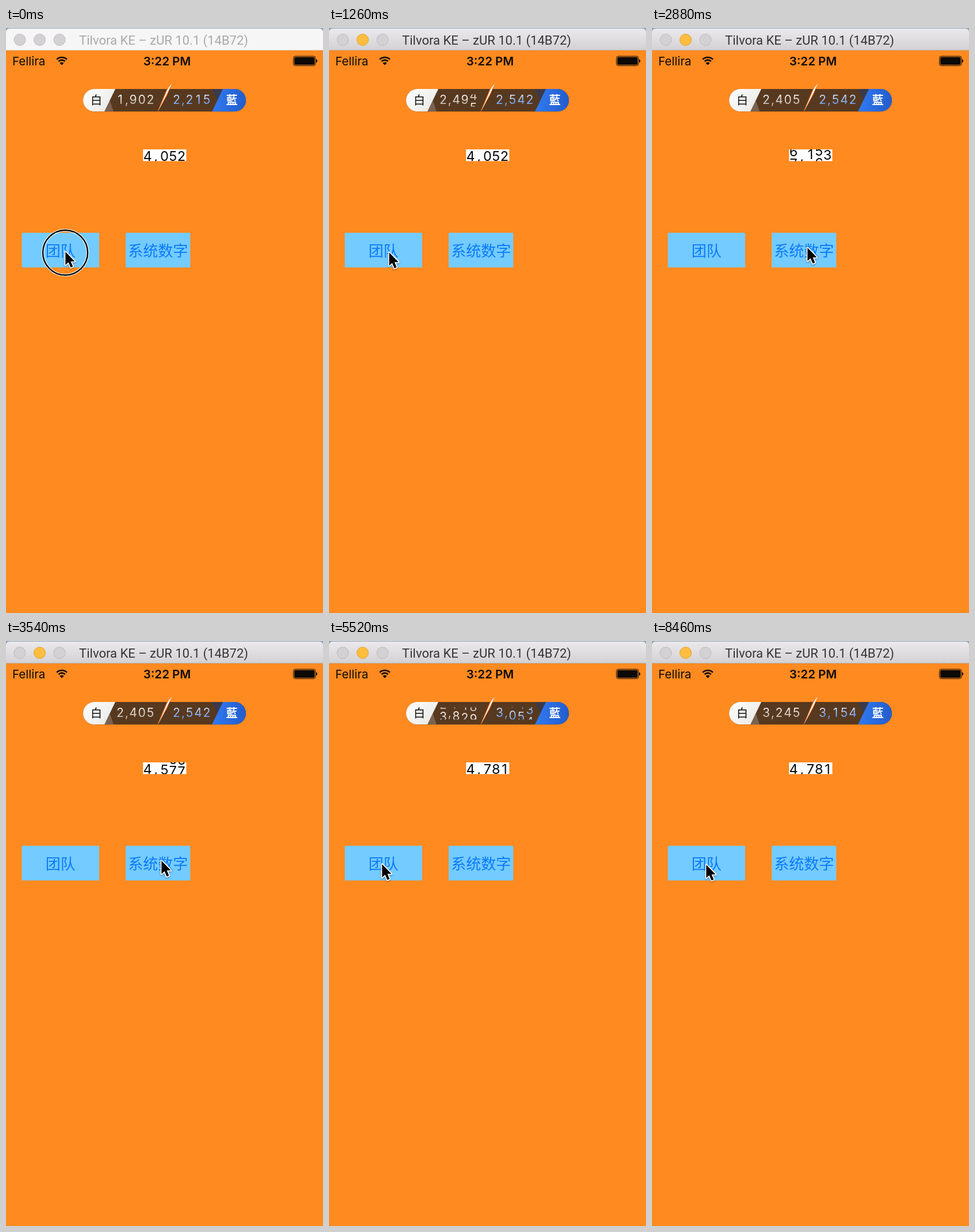
An HTML page with a canvas that plays this animation: 551x1017 px, repeating every 8520 ms.

```html
<!DOCTYPE html>
<html lang="zh">
<head>
<meta charset="utf-8">
<title>Rolling numbers</title>
<style>
html, body { margin: 0; width: 100%; height: 100%; overflow: hidden; background: #ff8a20; }
canvas { display: block; width: 551px; height: 1017px; }
</style>
</head>
<body>
<canvas id="stage" width="551" height="1017"></canvas>
<script>
const W = 551, H = 1017, LOOP = 8520, STEP = 60;
const ORANGE = '#ff8a20', INK = '#0c0a08';
const g = document.getElementById('stage').getContext('2d');
const UI = 'Inter, "Open Sans", sans-serif';
const CJK = '"Noto Sans CJK SC", "Noto Sans CJK", sans-serif';

function text(str, x, y, font, color, align = 'center') {
  g.font = font;
  g.fillStyle = color;
  g.textAlign = align;
  g.fillText(str, x, y);
}

function rect(x, y, w, h, color) {
  g.fillStyle = color;
  g.fillRect(x, y, w, h);
}

function poly(points, color) {
  g.beginPath();
  points.forEach(([x, y]) => g.lineTo(x, y));
  g.closePath();
  if (color) { g.fillStyle = color; g.fill(); }
}

function gradient(x0, y0, x1, y1, from, to) {
  const grad = g.createLinearGradient(x0, y0, x1, y1);
  grad.addColorStop(0, from);
  grad.addColorStop(1, to);
  return grad;
}

function roundRect(x, y, w, h, r) {
  g.beginPath();
  g.roundRect(x, y, w, h, r);
}

function circle(x, y, r) {
  g.beginPath();
  g.arc(x, y, r, 0, Math.PI * 2);
}

function outline(width, color) {
  g.lineWidth = width;
  g.strokeStyle = color;
  g.stroke();
}

const PILL_FONT = '21px Inter, sans-serif';
const TEAM_START = 4960, SYSTEM_START = 2690;

// A counter rolls between its values; the slot after the comma starts `gap` pitches later.
const counters = [
  {
    values: [1902, 2405, 3245], starts: [0, TEAM_START], time: 800, delay: 200,
    x: 198.5, base: 132.3, pitch: 15, gap: 0.5, line: 21, top: 115.5, font: PILL_FONT,
    color: (x, y) => gradient(x, y - 16, x, y, '#f6f3f0', '#c4bbb3')
  },
  {
    values: [2215, 2542, 3154], starts: [0, TEAM_START], time: 500, delay: 100,
    x: 296.5, base: 132.3, pitch: 15, gap: 0.5, line: 21, top: 115.5, font: PILL_FONT,
    color: (x, y) => gradient(x - 6, y - 16, x + 5, y, '#e9eefa', '#5590ee')
  },
  {
    values: [4052, 4781], starts: [SYSTEM_START], time: 800, delay: 200,
    x: 246, base: 230.7, pitch: 14.75, gap: 1, line: 20.5, top: 211, font: '23.5px Inter, sans-serif',
    color: () => '#0a0a0a'
  }
];

function drawCounter(c, t) {
  const k = c.starts.filter(s => t >= s).length - 1;
  const run = Math.max(k, 0), since = t - c.starts[run];
  const from = String(c.values[run]), to = String(c.values[run + 1]);
  g.save();
  g.beginPath();
  g.rect(c.x - 10, c.top, c.pitch * 5.5, c.line);
  g.clip();
  for (let i = 0; i < 4; i++) {
    // The comma takes a slot too, and an unchanged digit makes a full turn.
    const slot = i ? i + 1 : 0;
    const p = Math.min(1, Math.max(0, since / (c.time + c.delay * slot)));
    const turn = (to[i] - from[i] + 10) % 10 || 10;
    const pos = +from[i] + turn * p, n = Math.floor(pos);
    const x = c.x + c.pitch * (i ? i + c.gap : 0);
    for (const d of [n, n + 1]) {
      const y = c.base + (d - pos) * c.line;
      text(d % 10, x, y, c.font, c.color(x, y));
    }
  }
  const comma = c.x + c.pitch * (1 + c.gap) / 2;
  text(',', comma, c.base, c.font, c.color(comma, c.base));
  g.restore();
}

function titleBar(active) {
  rect(0, 0, W, 8, '#8ea4b8');
  roundRect(0, 1, W, 38, [6, 6, 0, 0]);
  g.fillStyle = active ? gradient(0, 1, 0, 39, '#ebe9eb', '#d3d1d3') : '#f6f6f6';
  g.fill();
  rect(0, 38, W, 1, active ? '#b9b1ae' : '#d9d2cc');
  for (let i = 0; i < 3; i++) {
    const lit = active && i === 1;
    circle(24 + 34.5 * i, 20.5, 10);
    g.fillStyle = lit ? '#fdbd3f' : '#d3d1d3';
    g.fill();
    outline(1, lit ? '#e0a135' : '#bdbabd');
  }
  text('Tilvora KE – zUR 10.1 (14B72)', 274, 29, '22px Roboto, sans-serif',
    active ? '#363436' : '#aaa9aa');
}

function statusBar() {
  text('Fellira', 11, 65, '20.5px ' + UI, INK, 'left');
  text('3:22 PM', 280, 65, '600 20.5px ' + UI, INK);
  const fan = [-Math.PI * 0.75, -Math.PI * 0.25];
  for (const r of [12.5, 7.8]) {
    g.beginPath();
    g.arc(97, 63.5, r, ...fan);
    outline(2.7, INK);
  }
  g.beginPath();
  g.moveTo(97, 64.5);
  g.arc(97, 64.5, 5, ...fan);
  g.fillStyle = INK;
  g.fill();
  roundRect(499.5, 49, 38.5, 16.5, 3.5);
  outline(1, INK);
  roundRect(501, 50.6, 35.5, 13.3, 2.2);
  g.fill();
  roundRect(539, 54.5, 2, 5.5, [0, 2, 2, 0]);
  g.fill();
}

function scorePill() {
  const left = 134, right = 417, top = 106, bottom = 145.3;
  const edge = 190, lean = 19, far = 377;
  g.save();
  roundRect(left, top, right - left, bottom - top, 19.7);
  g.clip();
  rect(left, top, right - left, 40, '#57391f');
  poly([[edge - lean, bottom], [edge - lean / 2, 126], [edge - 3, bottom]], '#7b6250');
  poly([[far, top], [far - lean / 2, 126], [far - lean, top]], '#3b3a4b');
  poly([[left, top], [edge, top], [edge - lean, bottom], [left, bottom]],
    gradient(left, top, 180, bottom, '#ffffff', '#e9e9e6'));
  poly([[far, top], [right, top], [right, bottom], [far - lean, bottom]],
    gradient(365, 125, right, 130, '#2f77ee', '#235ccb'));
  g.restore();
  text('白', 157, 133, '500 20px ' + CJK, INK);
  text('藍', 392.5, 133, '700 20px "Noto Sans CJK TC", ' + CJK, '#fff');
}

function bolt() {
  poly([[288.5, 96.5], [280, 105], [262, 148], [280, 117]], '#ed6a17');
  poly([[288.5, 96.5], [282, 104], [264, 146], [279.5, 115]], '#fff');
}

function button(x, w, label) {
  rect(x, 356, w, 60.3, '#74cbff');
  text(label, x + w / 2, 396.5, '300 26px ' + CJK, '#0a7aff');
}

const home = { x: 102, y: 387 };
const moves = [
  { at: 900, time: 600, dx: 2, dy: 2 },
  { at: 2160, time: 420, dx: 165, dy: -9 },
  { at: 4080, time: 540, dx: -178, dy: 6 },
  { at: 7320, time: 600, dx: 2, dy: 1 }
];

function pointerAt(t) {
  return moves.reduce(({ x, y }, m) => {
    const p = Math.min(1, Math.max(0, (t - m.at) / m.time));
    const e = p * p * (3 - 2 * p);
    return { x: x + m.dx * e, y: y + m.dy * e };
  }, home);
}

function pressed(t) {
  return t < STEP || [SYSTEM_START, TEAM_START - 60].some(s => t > s && t <= s + 130);
}

function pointer(t) {
  const { x, y } = pointerAt(t);
  if (pressed(t)) {
    circle(x + 1, y + 3.5, 39);
    outline(4.5, '#fff');
    outline(2.4, '#000');
  }
  g.save();
  g.translate(x + 1.3, y + 2);
  poly([[0, 0], [0, 23], [5.2, 18.2], [9.2, 27.4], [13, 25.7], [9.2, 16.7], [16.2, 16.7]]);
  g.lineJoin = 'round';
  g.shadowColor = 'rgba(0,0,0,.35)';
  g.shadowBlur = 3;
  g.shadowOffsetY = 1.5;
  outline(3.4, '#fff');
  g.shadowColor = 'transparent';
  g.fillStyle = '#000';
  g.fill();
  g.restore();
}

function draw(t) {
  rect(0, 0, W, H, ORANGE);
  titleBar(t >= STEP);
  statusBar();
  scorePill();
  rect(238.2, 211, 75.2, 20.4, '#fff');
  counters.forEach(c => drawCounter(c, t));
  bolt();
  button(27.5, 134.4, '团队');
  button(208, 112.3, '系统数字');
  pointer(t);
}

const begin = performance.now();
function tick() {
  const t = (performance.now() - begin) % LOOP;
  draw(Math.floor(t / STEP) * STEP);
  requestAnimationFrame(tick);
}
tick();
</script>
</body>
</html>
```
